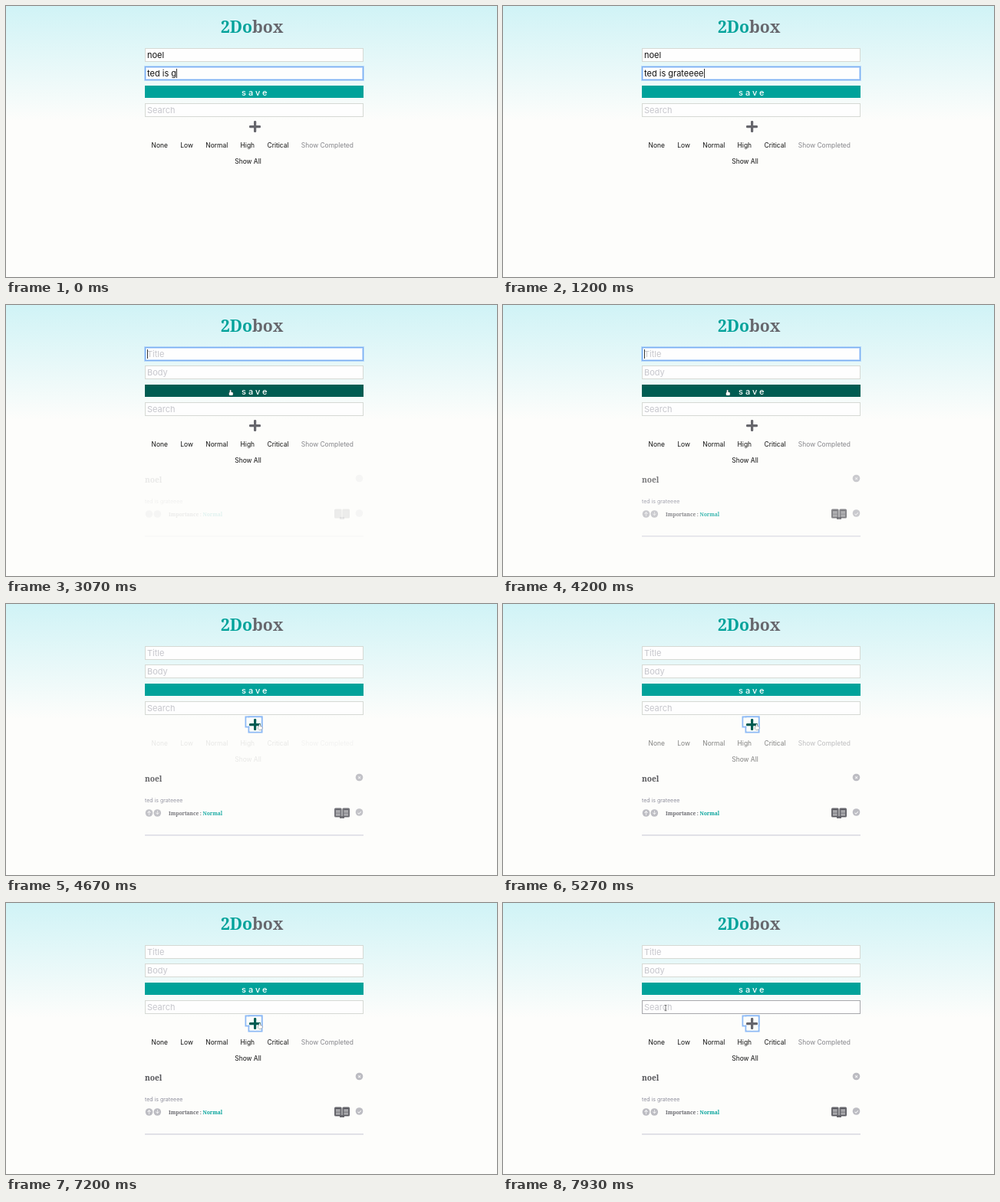
Animation, 640 px wide and 354 px high, one loop 8 s. Source, as an HTML page with a canvas:

```html
<!DOCTYPE html>
<html lang="en">
<head>
<meta charset="utf-8">
<title>2Dobox</title>
<style>
  html, body { margin: 0; width: 100%; height: 100%; overflow: hidden; background: #fdfdfb; }
  canvas { display: block; width: 640px; height: 354px; }
</style>
</head>
<body>
<canvas id="stage" width="640" height="354"></canvas>
<script>
const ctx = document.getElementById('stage').getContext('2d');
const LOOP = 8000;
const SANS = 'Inter, sans-serif';
const SLAB = '"Noto Serif", serif';
const TEAL = [0, 162, 154], DEEP = [0, 92, 82], GREY = [102, 102, 108];
const LEFT = 181, WIDE = 285, RIGHT = LEFT + WIDE;

const BODY = 'ted is grateeee';
const SAVED = 2730, TOGGLED = 4400;

// Resting places of the pointer
const ENTRY = [299, 70], SAVE = [292, 111], PLUS = [330, 157], SEARCH = [212, 137];

const clamp = v => Math.max(0, Math.min(1, v));
const ramp = (t, from, to) => clamp((t - from) / (to - from));
const lerp = (a, b, k) => a.map((v, i) => v + (b[i] - v) * k);
const rgb = c => `rgb(${c.map(Math.round).join()})`;

// CSS "ease" curve
function ease(p) {
  const bez = (u, a, b) => 3 * u * (1 - u) ** 2 * a + 3 * u * u * (1 - u) * b + u ** 3;
  let lo = 0, hi = 1;
  for (let i = 0; i < 20; i++) {
    const mid = (lo + hi) / 2;
    if (bez(mid, 0.25, 0.25) < p) lo = mid; else hi = mid;
  }
  return bez(lo, 0.1, 1);
}

function text(str, x, y, size, color, family = SANS, weight = 400) {
  ctx.font = `${weight} ${size}px ${family}`;
  ctx.fillStyle = color;
  ctx.fillText(str, x, y);
  return x + ctx.measureText(str).width;
}

function box(x, y, w, h, fill, radius = 0) {
  ctx.fillStyle = fill;
  ctx.beginPath();
  ctx.roundRect(x, y, w, h, radius);
  ctx.fill();
}

function outline(x, y, w, h, color, width = 1) {
  ctx.strokeStyle = color;
  ctx.lineWidth = width;
  ctx.strokeRect(x + .5, y + .5, w - 1, h - 1);
}

function centred(draw) {
  ctx.textAlign = 'center';
  draw();
  ctx.textAlign = 'left';
}

function faded(alpha, draw) {
  ctx.globalAlpha = alpha;
  draw();
  ctx.globalAlpha = 1;
}

function background() {
  const g = ctx.createLinearGradient(0, 0, 0, 150);
  g.addColorStop(0, '#d0f3f6');
  g.addColorStop(1, '#fdfdfb');
  ctx.fillStyle = g;
  ctx.fillRect(0, 0, 640, 354);
}

function header() {
  const x = text('2Do', 280, 35, 21.2, rgb(TEAL), SLAB, 700);
  text('box', x, 35, 21.2, rgb(GREY), SLAB, 700);
}

function field(y, hint, { value = '', focus, caret, hover }) {
  box(LEFT, y, WIDE, 18, '#fefefe');
  if (focus) outline(LEFT, y, WIDE, 18, 'rgba(130,180,250,.45)', 3);
  outline(LEFT, y, WIDE, 18, focus ? '#7aaef0' : hover ? '#a8a8ac' : '#d6d9d4');
  const start = LEFT + 3;
  const end = text(value || hint, start, y + 13, 11, value ? '#111' : '#c6c6cc');
  if (caret) box(Math.round(value ? end : start), y + 3, 1, 12, '#333');
}

function saveButton(t) {
  const hover = ramp(t, 2180, 2360) - ramp(t, 4260, 4460);
  box(LEFT, 104, WIDE, 16, rgb(lerp(TEAL, DEEP, hover)));
  ctx.letterSpacing = '3px';
  text('save', 307, 116.5, 11, '#fff', SANS, 500);
  ctx.letterSpacing = '0px';
}

function plus(t) {
  if (t >= TOGGLED) {
    // The focus ring follows the union of the button and its icon
    outline(312, 147, 22, 14, '#8dbaf5', 2);
    outline(316, 147, 18, 21, '#8dbaf5', 2);
    box(313.5, 148.5, 19, 11, '#fcfdfb');
    box(317.5, 148.5, 15, 18, '#fcfdfb');
  }
  const hover = ramp(t, 4380, 4560) - ramp(t, 7480, 7660);
  const color = rgb(lerp(GREY, DEEP, hover));
  box(317, 156, 15, 3.2, color, 1.3);
  box(323, 150, 3.2, 15, color, 1.3);
}

function filters() {
  let x = 189.6;
  for (const label of ['None', 'Low', 'Normal', 'High', 'Critical', 'Show Completed']) {
    x = text(label, x, 184.5, 8.45, label.includes(' ') ? '#85858a' : '#111') + 16.4;
  }
  centred(() => text('Show All', 315.5, 206, 8.45, '#111'));
}

function badge(x, y, glyph) {
  box(x - 4.8, y - 4.8, 9.6, 9.6, '#bcbcc2', 4.8);
  centred(() => text(glyph, x, y + 2.5, 7, '#fff', SANS, 600));
}

function book() {
  for (const x of [428, 438.4]) {
    box(x, 266.5, 9.6, 12, rgb(GREY), 1.5);
    for (let i = 0; i < 3; i++) box(x + 2, 270 + i * 2.5, 5.6, .9, '#fff');
  }
  box(435, 277, 6, 3, rgb(GREY));
}

function card() {
  text('noel', LEFT, 232, 10.2, '#56565a', SLAB, 700);
  text(BODY, LEFT, 258.5, 7, '#8e8e9c');
  badge(460.5, 226.5, '×');
  badge(186.5, 273, '↑');
  badge(197.3, 273, '↓');
  badge(460.5, 272, '✓');
  const x = text('Importance : ', 212, 275.5, 6.6, '#66666c', SLAB, 700);
  text('Normal', x, 275.5, 6.6, rgb(TEAL), SLAB, 700);
  book();
  box(LEFT, 301.5, WIDE, 1, '#c6c6d4');
}

function pointerAt(t) {
  const toSave = lerp(ENTRY, SAVE, ramp(t, 1870, 2330));
  const toPlus = lerp(toSave, PLUS, ramp(t, 4230, TOGGLED));
  return lerp(toPlus, SEARCH, ramp(t, 7470, 7930));
}

const within = ([x, y], top, height, left = LEFT, right = RIGHT) =>
  x > left && x < right && y >= top && y <= top + height;

function pointer(at) {
  ctx.save();
  ctx.translate(...at);
  ctx.lineWidth = .8;
  ctx.strokeStyle = '#555';
  if ([55, 79, 127].some(top => within(at, top, 18))) {
    box(-.4, -4, .8, 8, '#555');
    for (const y of [-4, 3.5]) box(-1.5, y, 3, .6, '#555');
  } else if (within(at, 103, 17) || within(at, 147, 21, 312, 334)) {
    ctx.beginPath();
    ctx.roundRect(-.2, 0, 1.6, 5, .8);
    ctx.roundRect(-1.2, 3, 5, 4, 1.2);
    ctx.stroke();
    ctx.fillStyle = '#fff';
    ctx.fill();
  } else {
    ctx.beginPath();
    ctx.moveTo(0, 0);
    ctx.lineTo(0, 8);
    ctx.lineTo(5.6, 5.6);
    ctx.closePath();
    ctx.fillStyle = '#222';
    ctx.fill();
  }
  ctx.restore();
}

function draw(t) {
  const typing = t < SAVED;
  const naming = !typing && t < TOGGLED;
  const typed = Math.floor(Math.max(0, t - 35) / 165);
  const blink = Math.floor((t - SAVED) / 500) % 2 === 0;
  const mouse = pointerAt(t);

  background();
  header();
  field(55, 'Title', { value: typing ? 'noel' : '', focus: naming, caret: naming && blink });
  field(79, 'Body', { value: typing ? BODY.slice(0, 8 + typed) : '', focus: typing, caret: t < 1400 });
  saveButton(t);
  field(127, 'Search', { hover: within(mouse, 127, 18) });
  plus(t);
  faded(t < TOGGLED ? 1 : ease(ramp(t, TOGGLED, 7270)), filters);
  if (!typing) faded(ease(ramp(t, SAVED, SAVED + 3000)), card);
  if (t >= 1870) pointer(mouse);
}

const start = performance.now();
function tick() {
  draw((performance.now() - start) % LOOP);
  requestAnimationFrame(tick);
}
tick();
</script>
</body>
</html>
```
